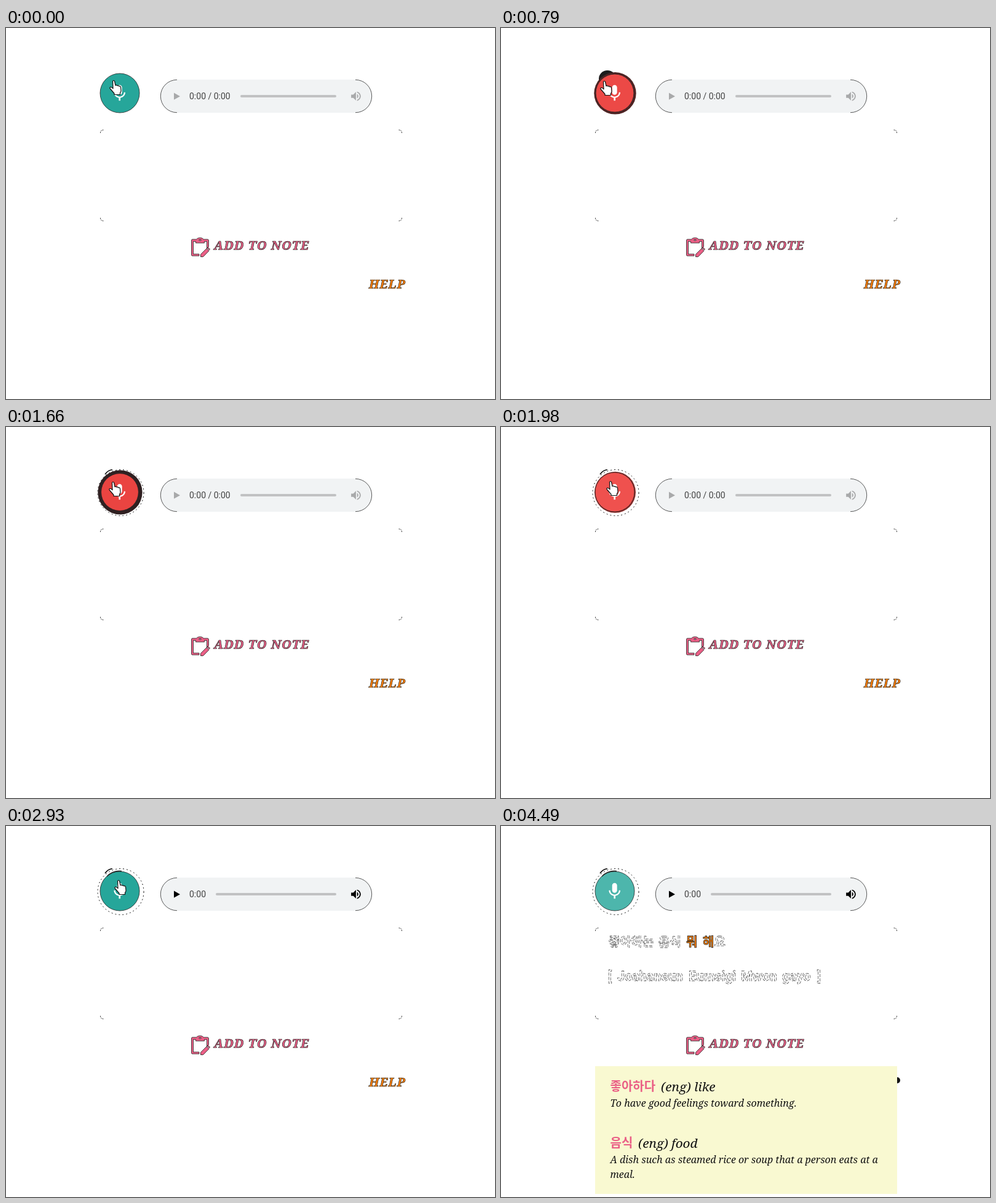
An HTML page that plays this animation: 795 by 604 pixels, repeating every 5340 ms.

```html
<!DOCTYPE html>
<html lang="en">
<head>
<meta charset="utf-8">
<title>Voice note</title>
<style>
html, body { margin: 0; width: 100%; height: 100%; overflow: hidden; background: #fff; }
svg { display: block; width: 795px; height: 604px; }
.ui { font: 14px Roboto, sans-serif; fill: #444; }
.slab { font: italic bold 20px "Noto Serif", serif; letter-spacing: 1.2px; stroke: #222; stroke-width: .7px; }
.ko { font: 900 20px "Noto Sans CJK KR", "Noto Sans CJK", sans-serif; }
.ghost { fill: #fff; stroke: #555; stroke-width: .8px; stroke-dasharray: 5 2; }
.hot { fill: #ff8000; stroke: #222; stroke-width: .8px; stroke-dasharray: none; }
.latin { font: bold 21.5px Roboto, sans-serif; }
.def { font: italic 500 16px "Noto Serif", serif; fill: #111; }
.word { font-size: 20.8px; }
.pink { fill: #ea5f86; }
</style>
</head>
<body>
<svg viewBox="0 0 795 604">
  <g id="trace" fill="none" stroke="#111">
    <circle cx="186.5" cy="107" r="37.5" stroke-dasharray="2 4"/>
    <path d="M161 77Q166 70 173 69.5" stroke-width="1.6"/>
  </g>
  <circle id="bump" cx="173" cy="83" r="14" fill="#1c1c1c"/>
  <circle id="ring" cx="185.5" cy="106.3"/>
  <circle id="button" cx="185" cy="106" stroke="#222" stroke-width=".8"/>
  <path id="arc" d="M164 82Q174 72 188 73.5" fill="none" stroke="#222" stroke-width="1.4"/>
  <path transform="translate(168.7 90.2) scale(1.333)" fill="#fff" d="M12 14c1.66 0 2.99-1.34 2.99-3L15 5c0-1.66-1.34-3-3-3S9 3.34 9 5v6c0 1.66 1.34 3 3 3zm5.3-3c0 3-2.54 5.1-5.3 5.1S6.7 14 6.7 11H5c0 3.41 2.72 6.23 6 6.72V21h2v-3.28c3.28-.48 6-3.3 6-6.72h-1.7z"/>

  <rect x="251" y="84" width="344" height="54" rx="27" fill="#f1f3f4"/>
  <path d="M278 84.3A26.7 26.7 0 0 0 278 137.7M568 84.3A26.7 26.7 0 0 1 568 137.7" fill="none" stroke="#333" stroke-width=".8"/>
  <g id="icons">
    <path d="M273 105.5V116.8L283 111.2Z"/>
    <path transform="translate(558.5 100.6) scale(.87)" d="M3 9v6h4l5 5V4L7 9H3zm13.5 3c0-1.77-1.02-3.29-2.5-4.03v8.05c1.48-.73 2.5-2.25 2.5-4.02zM14 3.23v2.06c2.89.86 5 3.54 5 6.71s-2.11 5.85-5 6.71v2.06c4.01-.91 7-4.49 7-8.77s-2.99-7.86-7-8.77z"/>
  </g>
  <text id="clock" class="ui" x="298" y="116"></text>
  <path id="track" stroke="#c1c2c3" stroke-width="4" stroke-linecap="round"/>

  <path d="M153.5 171q0-5 5-5M638.5 166q5 0 5 5M153.5 309q0 5 5 5M638.5 314q5 0 5-5" fill="none" stroke="#333" stroke-dasharray="2 1"/>

  <g id="result">
    <text class="ko ghost" y="196"><tspan x="175">좋아하는</tspan><tspan x="256">음식</tspan><tspan class="hot" x="301">뭐</tspan><tspan class="hot" x="328">해</tspan><tspan x="346.5">요</tspan></text>
    <text class="latin ghost" y="252"><tspan x="174">[</tspan><tspan x="189">Joahaneun</tspan><tspan x="305">Eumsigi</tspan><tspan x="390">Mwon</tspan><tspan x="457">gayo</tspan><tspan x="514">]</tspan></text>
  </g>

  <g class="pink" stroke="#222" stroke-width=".8">
    <path fill-rule="evenodd" d="M303 344H309.5Q311 341.5 315.500 341.500T321 344H327.500Q329.500 344 329.500 346V356L326.500 359V347.500H322.500V350H308.500V347.500H304.500V368H314V371H303Q301.500 371 301.500 369.500V346Q301.500 344 303 344ZM314 344.500H317V346H314Z"/>
    <path d="M316.500 372.500V368.500L326 359L330 362.800L320.500 372.500ZM327 358L328.300 356.800L331.500 360L330.500 361.500Z"/>
  </g>
  <text class="slab pink" x="338" y="361">ADD TO NOTE</text>
  <text id="help" class="slab" fill="#ff8000" x="590" y="424">HELP</text>

  <g id="panel">
    <path d="M644 409a5 5 0 0 1 0 10Z" fill="#111"/>
    <rect x="153" y="391" width="491" height="208" fill="#f9f9d1"/>
    <text class="ko pink" x="177.500" y="431">좋아하다</text>
    <text class="def word" x="260" y="432">(eng) like</text>
    <text class="def" x="177.500" y="457">To have good feelings toward something.</text>
    <text class="ko pink" x="177.500" y="523">음식</text>
    <text class="def word" x="223" y="524">(eng) food</text>
    <text class="def" x="177.500" y="549">A dish such as steamed rice or soup that a person eats at a</text>
    <text class="def" x="177.500" y="573">meal.</text>
  </g>

  <path id="hand" fill="#fff" stroke="#111" stroke-width="1.2" stroke-linejoin="round" d="M-1.500 1.500Q0-.5 1.500 1.500L3 8.500Q4.500 7 6 9Q7.500 7.800 8.800 9.800Q11 9 11.500 11.500L12 17Q12 19 10.500 20.500V23.500H1V21.500L-5.500 14Q-7 12-5 11.300Q-3.500 11-1 13.500Z"/>
</svg>
<script>
const LOOP = 5340, STEP = 79;
const CLICK = 240, RECORD = 400, STOP = 2930, RESULT = 3710, DONE = 3790, PANEL = 4490;
const PULSE = 1600;

// time, x, y of the fingertip
const route = [
  [0, 175, 85], [160, 171, 85], [CLICK, 167, 85], [RECORD, 167, 85],
  [1270, 170, 89], [1980, 178, 88], [STOP, 183, 88]
];

const $ = id => document.getElementById(id);
const set = (id, attrs) => {
  for (const k in attrs) $(id).setAttribute(k, attrs[k]);
};
const show = (id, on) => set(id, { visibility: on ? 'visible' : 'hidden' });
const mix = (a, b, p) => a + (b - a) * p;
const tint = (a, b, p) => `rgb(${a.map((v, i) => Math.round(mix(v, b[i], p)))})`;

function fingertip(t) {
  if (t >= 3160) return [172, 75];
  const i = route.findLastIndex(k => k[0] <= t);
  const a = route[i], b = route[i + 1];
  if (!b || t < RECORD) return a.slice(1);
  const p = (t - a[0]) / (b[0] - a[0]);
  return [mix(a[1], b[1], p), mix(a[2], b[2], p)];
}

function drawButton(t) {
  const live = t >= RECORD && t < STOP;
  show('ring', live);
  show('bump', t >= CLICK && t < 1500);
  show('trace', t >= 1500);
  show('arc', t >= STOP);
  if (!live) {
    const fill = t < RESULT ? '#26a69a' : t < DONE ? '#3aaea3' : '#4db6ac';
    set('button', { r: 32, fill });
    return;
  }
  const s = (1 - Math.cos((t - RECORD) / PULSE * 2 * Math.PI)) / 2;
  const base = t < RECORD + PULSE / 2 ? 32 : 33.5;
  set('button', { r: 32 - 3 * s, fill: tint([239, 81, 78], [229, 57, 53], s) });
  set('ring', { r: mix(base, 38.5, s), fill: tint([140, 45, 42], [47, 32, 33], Math.min(1, s * 2)) });
}

function draw(time) {
  const t = time >= RECORD && time < STOP
    ? RECORD + Math.floor((time - RECORD) / STEP) * STEP
    : time;
  drawButton(t);

  const loaded = time >= STOP;
  set('icons', { fill: loaded ? '#000' : '#a8a9aa' });
  set('track', { d: `M${loaded ? 343 : 383} 111H535` });
  $('clock').textContent = loaded ? '0:00' : '0:00 / 0:00';

  show('result', t >= RESULT);
  show('panel', t >= PANEL);
  show('help', t < PANEL);
  show('hand', t < RESULT);
  set('hand', { transform: `translate(${fingertip(t).map(Math.round)})` });
}

const start = performance.now();
function tick() {
  draw((performance.now() - start) % LOOP);
  requestAnimationFrame(tick);
}
tick();
</script>
</body>
</html>
```
